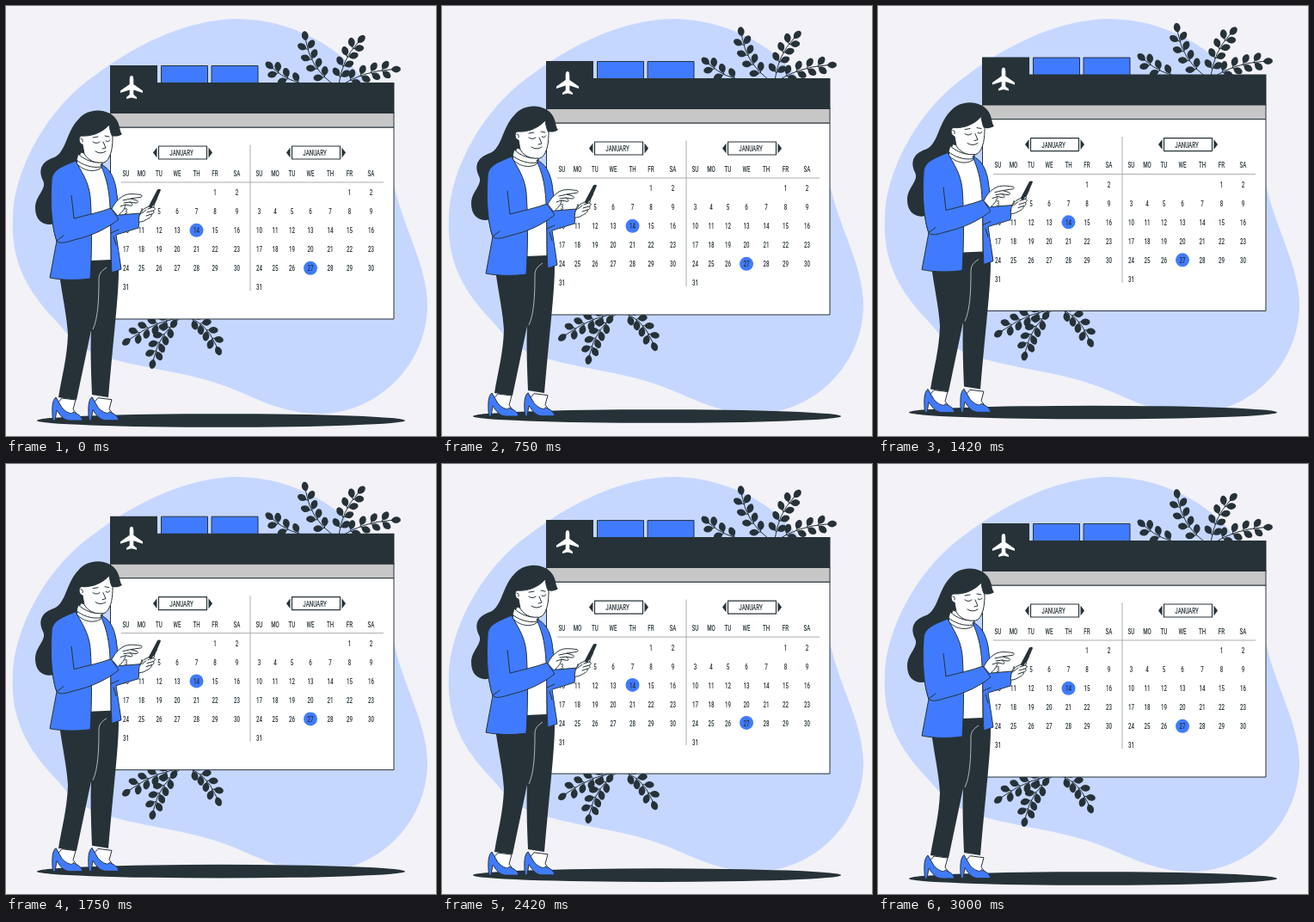
An HTML page for the animation above (3.04 s loop, 500x500 px).

```html
<!DOCTYPE html>
<html lang="en">
<head>
<meta charset="utf-8">
<title>Calendar</title>
<style>
html, body { margin: 0; width: 100%; height: 100%; overflow: hidden; background: #f2f2f7; }
svg { display: block; width: 100vw; height: 100vh; }
text { font: 500 9.8px Roboto, "Liberation Sans", sans-serif; text-anchor: middle; fill: #263238; }
.ink { fill: #263238; }
.line { fill: none; stroke: #263238; stroke-width: 1; stroke-linecap: round; stroke-linejoin: round; }
.blue, .white { stroke: #263238; stroke-width: 1; stroke-linejoin: round; }
.blue { fill: #407bff; }
.white { fill: #fff; }
.rule { fill: none; stroke: #a9adaf; stroke-width: 1; }
</style>
</head>
<body>
<svg viewBox="0 0 500 500">
  <path fill="#c6d7ff" d="M8 245C10 188 49 118 103 81C149 46 210 15 270 15C340 16 400 55 425 100C440 130 440 170 452 212C463 260 491 305 490 350C488 420 430 474 365 474C320 474 290 455 255 442C210 425 160 422 115 408C80 397 73 382 56 364C26 332 5 298 8 245Z"/>
  <g id="scene">
    <ellipse class="ink" cx="250" cy="482" rx="214" ry="7.8"/>
    <g id="plants"></g>

    <g id="calendar">
      <path class="blue" d="M180.500 69.500H234.500V92H180.500ZM239 69.500H293V92H239Z"/>
      <path class="white" d="M121.500 141H451V364H121.500Z"/>
      <path fill="#c7c7c7" stroke="#263238" d="M121.500 124H451V141H121.500Z"/>
      <path class="ink" d="M121 69H176V89H451.500V125H121Z"/>
      <path fill="#fff" d="M146 81C148 81 148.300 84 148.300 86V91L159 98.500V101L148.300 97.500V103L152 106V108L146 106.500L140 108V106L143.700 103V97.500L133 101V98.500L143.700 91V86C143.700 84 144 81 146 81Z"/>
      <path class="rule" d="M134 205H439M284 161.500V331"/>
    </g>

    <g id="woman">
      <path class="ink" d="M84 132C96 117 121 119 129 133C133 140 132 146 135 149C131 152 126 152 123 151L122 162L92 172C87 178 84 183 80 187C62 196 56 215 57 253C45 257 34 250 34 235C34 220 48 213 43 203C36 188 44 180 56 176C70 170 70 146 84 132Z"/>
      <path class="white" d="M81 182C88 176 105 178 112 186L122 205V300H97Z"/>
      <path class="ink" d="M62 312L98 296L122 295L131 308C131 335 126 375 119 455L100 452C99 425 98 402 99 377L82 458L61 455C65 430 71 410 72 382C71 362 66 340 62 312Z"/>
      <path fill="none" stroke="#d5d8da" stroke-width=".8" d="M117 304C111 308 108 311 108 318C108 342 107 363 101 376"/>
      <g id="foot">
        <path class="white" d="M65 456L81 458L78 469L85 478L66 475L59 463Z"/>
        <path class="blue" d="M58 455C54 458 53 466 54.500 482H57L59 470C64 477 67 482 75 482H89C88 476 82 474 78 472C77 476 69 472 65 467Z"/>
      </g>
      <use href="#foot" x="42" y="-.3"/>
      <path class="white" d="M87 170L82 183C91 193 105 194 112 187L112 178Z"/>
      <path class="white" d="M88 151C101 152 113 146 120 138C121 145 122 149 124 152C124 162 123 175 116 181C109 185 96 181 91 172L89 161C84 160 84 151 88 151Z"/>
      <path class="white" d="M84 172C91 179 102 183 112 182L111 187C99 189 88 184 82 179Z"/>
      <path class="line" stroke-width=".8" d="M101 158Q105 161 109 158M116 157Q119 159 121 156M101 153L107 152M115 151L120 152M113 158L116 165L112 166M104 169Q110 173 116 169M87 154Q90 154 89 158"/>
      <path class="blue" d="M110 184C119 188 125 196 128 212L132 243L156 241L154 258L128 266L134 306L123 310C121 276 123 238 119 214C117 201 113 192 110 184Z"/>
      <path class="line" d="M122 264L131 260M125 268L128 278"/>
      <path class="blue" d="M81 180C64 187 53 191 53 204C51 234 55 263 59 273L51 316C66 319 83 319 98 317C100 284 100 250 98 222C96 203 87 192 81 180Z"/>
      <path class="blue" d="M53 205C51 232 54 261 59 273C62 277 70 275 79 272C101 267 117 259 131 248L122 235C109 240 94 243 79 247L76 220"/>
      <path class="line" d="M59 273L67 267"/>
      <path class="ink" d="M176 213.500Q179 212 180 214L168 242L162 246L160 244Z"/>
      <path class="white" d="M155 244C158 239 159 236 162 235L170 231C173 230 173 233 171 234C174 234 174 237 171 238C173 239 172 242 169 242C170 245 166 247 162 249C159 251 156 251 154 251Z"/>
      <path class="line" stroke-width=".7" d="M165 236L171 234M164 240L171 238M163 244L169 242M158 241L163 237"/>
      <path class="ink" d="M172 222L176 224L169 235L166 234Z"/>
      <path class="white" d="M123 236C126 229 131 224 136 221C143 217 151 219 157 219.500C159 221 158 222.500 155 222.500L145 224L152 226C155 228 153 229 150 229L144 228C149 231 147 233 144 232L139 231C138 236 135 240 130 244Z"/>
      <path class="line" stroke-width=".7" d="M136 226L145 224M137 229L144 228M133 233L139 231"/>
    </g>
  </g>
</svg>
<script>
const $ = id => document.getElementById(id);

function add(parent, tag, attrs, label) {
  const el = document.createElementNS("http://www.w3.org/2000/svg", tag);
  for (const key in attrs) el.setAttribute(key, attrs[key]);
  if (label !== undefined) el.textContent = label;
  parent.append(el);
  return el;
}

// One condensed face for all lettering
function write(label, x, y) {
  add($("calendar"), "text", { transform: `translate(${x} ${y + 3.4}) scale(.63 1)` }, label);
}

function leaf(x, y, angle) {
  add($("plants"), "path", {
    class: "ink",
    transform: `translate(${x} ${y}) rotate(${angle})`,
    d: "M0-.4L2-.5C5-4.500 9-5 12.500-1.700Q13.500 0 12.500 1.700C9 5 5 4.500 2 .5L0 .4Z"
  });
}

// A bent stem with paired leaves and one at the tip
function branch([x0, y0, cx, cy, x1, y1], pairs, first = .3) {
  add($("plants"), "path", { class: "line", d: `M${x0} ${y0}Q${cx} ${cy} ${x1} ${y1}` });
  const at = (a, b, c, t) => (1 - t) ** 2 * a + 2 * t * (1 - t) * b + t * t * c;
  const slope = (a, b, c, t) => (1 - t) * (b - a) + t * (c - b);
  for (let i = 0; i <= pairs; i++) {
    const t = i === pairs ? 1 : first + (0.85 - first) * i / Math.max(1, pairs - 1);
    const x = at(x0, cx, x1, t), y = at(y0, cy, y1, t);
    const dir = Math.atan2(slope(y0, cy, y1, t), slope(x0, cx, x1, t)) * 180 / Math.PI;
    if (i === pairs) leaf(x, y, dir);
    else for (const side of [-48, 48]) leaf(x, y, dir + side);
  }
}

branch([380, 91, 354, 72, 349, 42], 4, .2);
branch([387, 91, 391, 62, 408, 44], 4, .15);
branch([390, 92, 415, 76, 446, 74], 4, .2);
branch([352, 92, 328, 88, 312, 74], 3, .25);
branch([214, 361, 176, 364, 146, 386], 5, .2);
branch([205, 361, 178, 380, 172, 409], 4, .3);
branch([208, 361, 232, 366, 244, 394], 4, .2);

const days = ["SU", "MO", "TU", "WE", "TH", "FR", "SA"];
const months = [
  { mid: 205.5, cols: [139.5, 157.5, 178, 199, 221.5, 243, 268.5], pick: 14 },
  { mid: 360.5, cols: [294.5, 313, 332.5, 354, 377, 399.5, 424.5], pick: 27 }
];

for (const { mid, cols, pick } of months) {
  add($("calendar"), "rect", { class: "line", x: mid - 28, y: 163, width: 56, height: 15, style: "stroke-width:1.2" });
  for (const s of [-1, 1])
    add($("calendar"), "path", { class: "ink", d: `M${mid + s * 30} 164.500L${mid + s * 34.5} 170.500L${mid + s * 30} 176.500Z` });
  write("JANUARY", mid - 1.5, 170.8);
  days.forEach((day, i) => write(day, cols[i], 194.5));
  for (let n = 1; n <= 31; n++) {
    const cell = n + 4, x = cols[cell % 7], y = 217 + 22 * Math.floor(cell / 7);
    if (n === pick) add($("calendar"), "circle", { cx: x, cy: y - .2, r: 8, fill: "#407bff" });
    write(n, x, y);
  }
}

// Linear rise and fall at 24 pictures a second, with a short rest at the bottom
const LOOP = 3040, STEPS = 72, RISE = 10;
const start = performance.now();

function draw(now) {
  const time = Math.max(0, now - start) % LOOP;
  const step = Math.min(STEPS, Math.floor((time + 4) * 24 / 1000));
  const y = -RISE * (1 - Math.abs(1 - 2 * step / STEPS));
  $("scene").setAttribute("transform", `translate(0 ${y.toFixed(3)})`);
  requestAnimationFrame(draw);
}
draw(start);
</script>
</body>
</html>
```
